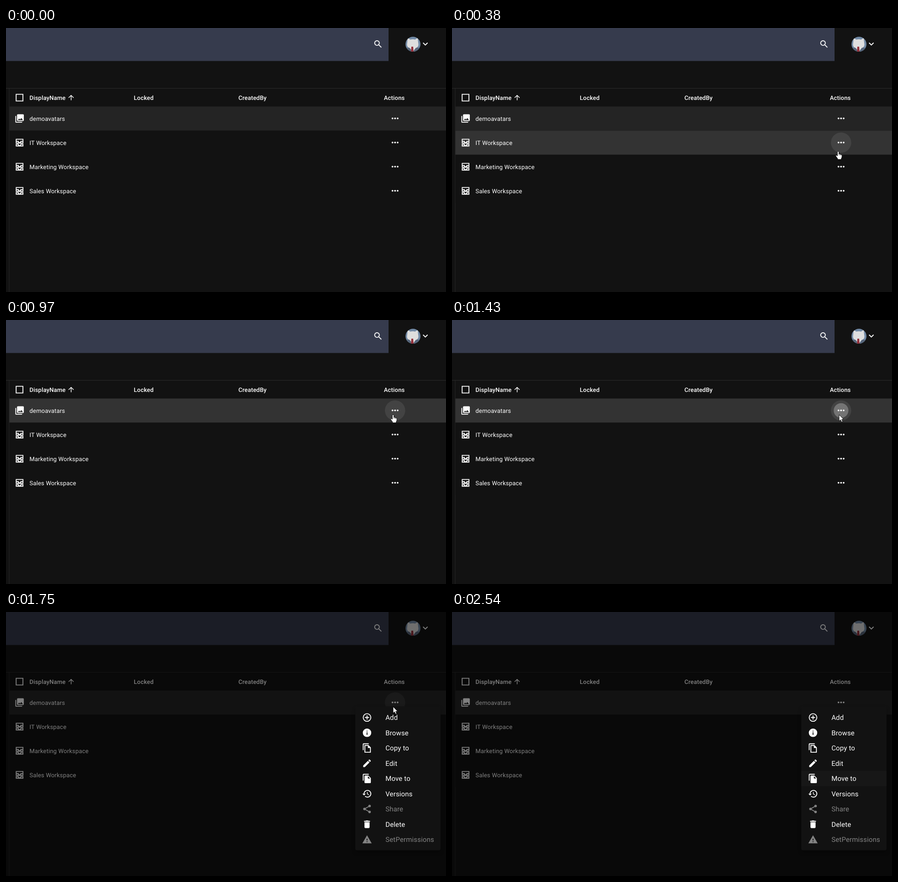
These frames come from a looping animation (965x580 px, 3150 ms). An HTML page:

```html
<!DOCTYPE html>
<html lang="en">
<head>
<meta charset="utf-8">
<title>Content list with action menu</title>
<style>
html, body { margin: 0; width: 100%; height: 100%; overflow: hidden; background: #121212; }
svg { display: block; width: 965px; height: 580px; }
text { font-family: Roboto, sans-serif; fill: #fff; text-rendering: geometricPrecision; letter-spacing: .15px; }
.cell { font-size: 13.1px; }
.head { font-size: 13.1px; font-weight: 500; }
.item { font-size: 15px; }
</style>
</head>
<body>
<svg id="stage" viewBox="0 0 965 580" xmlns="http://www.w3.org/2000/svg"></svg>
<script>
const LOOP = 3150;
const ROW_TOP = 172.5, ROW_H = 53, BTN_X = 853.3;
const stage = document.getElementById('stage');

function add(parent, tag, attrs, text) {
  const el = document.createElementNS('http://www.w3.org/2000/svg', tag);
  for (const k in attrs) el.setAttribute(k, attrs[k]);
  if (text) el.textContent = text;
  parent.appendChild(el);
  return el;
}
const set = (el, attrs) => { for (const k in attrs) el.setAttribute(k, attrs[k]); };
const group = parent => add(parent, 'g', {});
const rect = (parent, x, y, width, height, fill) => add(parent, 'rect', { x, y, width, height, fill });
const disc = (parent, cx, cy, r, fill) => add(parent, 'circle', { cx, cy, r, fill });
const label = (parent, x, y, cls, text) => add(parent, 'text', { x, y, class: cls }, text);

// Icons live on a 24-unit grid: fill path, 2-unit stroke path, 6-unit round dots
const icons = {
  box: { line: 'M4 4h16v16H4z' },
  up: { fill: 'M4 12l1.41 1.41L11 7.83V20h2V7.83l5.58 5.59L20 12l-8-8z' },
  photos: { fill: 'M22 16V4c0-1.1-.9-2-2-2H8c-1.1 0-2 .9-2 2v12c0 1.1.9 2 2 2h12c1.1 0 2-.9 2-2zm-11-4l2.03 2.71L16 11l4 5H8zM2 6v14c0 1.1.9 2 2 2h14v-2H4V6z' },
  inbox: { line: 'M4 4h16v9H4zM4 9h5a3 3 0 0 0 6 0h5M4 16h5a3 3 0 0 0 6 0h5v4H4z' },
  search: { line: 'M4 9.5a5.5 5.5 0 1 0 11 0a5.5 5.5 0 1 0-11 0M13.6 13.6l6.2 6.2' },
  down: { fill: 'M16.59 8.59L12 13.17 7.41 8.59 6 10l6 6 6-6z' },
  plus: { line: 'M3 12a9 9 0 1 0 18 0a9 9 0 1 0-18 0M12 7v10M7 12h10' },
  info: { fill: 'M2 12a10 10 0 1 0 20 0a10 10 0 1 0-20 0M11 11h2v6h-2zM11 7h2v2h-2z' },
  copy: { fill: 'M16 1H4c-1.1 0-2 .9-2 2v14h2V3h12zM14 7v5h5l2-1l-6-6z', line: 'M7 6h7.6L20 11.4V22H7z' },
  pen: { fill: 'M3 17.25V21h3.75L17.81 9.94l-3.75-3.75zM20.71 7.04c.39-.39.39-1.02 0-1.41l-2.34-2.34c-.39-.39-1.02-.39-1.41 0l-1.83 1.83 3.75 3.75z' },
  move: { fill: 'M16 1H4c-1.1 0-2 .9-2 2v14h2V3h12zM15 5l6 6v10c0 1.1-.9 2-2 2H8c-1.1 0-2-.9-2-2V7c0-1.1.9-2 2-2zM14 12h5.5L14 6.5z' },
  history: { fill: 'M1 12l4 4 4-4zM12 8v5l4.28 2.54.72-1.21-3.5-2.08V8z', line: 'M5 12a8 8 0 1 1 2.35 5.65' },
  share: { line: 'M18 5L6 12l12 7', dots: 'M18 5h0M6 12h0M18 19h0' },
  bin: { fill: 'M6 19c0 1.1.9 2 2 2h8c1.1 0 2-.9 2-2V7H6zM19 4h-3.5l-1-1h-5l-1 1H5v2h14z' },
  warn: { fill: 'M1 21h22L12 2zM11 16h2v2h-2zM11 10h2v4h-2z' }
};

function icon(parent, name, x, y, scale = .93) {
  const g = add(parent, 'g', { transform: `translate(${x} ${y}) scale(${scale}) translate(-12 -12)` });
  const { fill, line, dots } = icons[name];
  if (fill) add(g, 'path', { d: fill, fill: '#fff', 'fill-rule': 'evenodd' });
  if (line) add(g, 'path', { d: line, fill: 'none', stroke: '#fff', 'stroke-width': 2 });
  if (dots) add(g, 'path', { d: dots, stroke: '#fff', 'stroke-width': 6, 'stroke-linecap': 'round' });
}

// Page
rect(stage, 0, 0, 965, 580, '#121212');
rect(stage, 0, 0, 839, 72.5, '#363b4d');
icon(stage, 'search', 816, 35.4);
icon(stage, 'down', 919.7, 35);

const defs = add(stage, 'defs', {});
disc(add(defs, 'clipPath', { id: 'face' }), 892.6, 35.6, 16.4);
const blur = add(defs, 'filter', { id: 'soft', x: '-20%', y: '-20%', width: '140%', height: '140%' });
add(blur, 'feGaussianBlur', { stdDeviation: 5 });

const avatar = add(stage, 'g', { 'clip-path': 'url(#face)' });
rect(avatar, 876, 19, 34, 34, '#7189a5');
add(avatar, 'path', { d: 'M876 53V46Q884 41 892 41T910 46V53z', fill: '#56657a' });
add(avatar, 'path', { d: 'M881 22l6 3.5q5-1.5 10 0l6-3.5 1 10q2 8-3 11-9 4-18 0-5-3-3-11z', fill: '#dedede' });
add(avatar, 'path', { d: 'M885 43h14l-7 10z', fill: '#e4e4e4' });
add(avatar, 'path', { d: 'M889 41h4l1 12h-6z', fill: '#94303a' });

rect(stage, 0, 132, 965, 1, '#2b2b2b');
rect(stage, 6.5, 133, 1, 447, '#272727');
icon(stage, 'box', 29.7, 153);
icon(stage, 'up', 142.8, 152.8, .74);
[['DisplayName', 51.5], ['Locked', 280.3], ['CreatedBy', 509.7], ['Actions', 828.7]]
  .forEach(([text, x]) => label(stage, x, 157.6, 'head', text));

const names = ['demoavatars', 'IT Workspace', 'Marketing Workspace', 'Sales Workspace'];
const rows = names.map((name, i) => {
  const top = ROW_TOP + i * ROW_H, y = top + 26.3;
  const bg = rect(stage, 7.5, top, 958, ROW_H, '#121212');
  const halo = disc(stage, BTN_X, y, 22.3, '#fff');
  const ripple = disc(stage, BTN_X, y, 0, '#fff');
  icon(stage, i ? 'inbox' : 'photos', 29.8, y);
  label(stage, 51.5, y + 4.8, 'cell', name);
  for (const dx of [-5.6, 0, 5.6]) disc(stage, BTN_X + dx, y - .2, 1.9, '#fff');
  return { top, y, bg, halo, ripple };
});

// Menu
const shade = rect(stage, 0, 0, 965, 580, '#000');
const menu = group(stage);
set(rect(menu, 767, 213, 185, 314, '#000'), { filter: 'url(#soft)', opacity: .35 });
set(rect(menu, 766, 207.3, 187, 316.2, '#121212'), { rx: 3.7 });
const mark = rect(menu, 766, 349, 187, 33.5, '#171717');
[['plus', 'Add'], ['info', 'Browse'], ['copy', 'Copy to'], ['pen', 'Edit'], ['move', 'Move to'],
 ['history', 'Versions'], ['share', 'Share', 1], ['bin', 'Delete'], ['warn', 'SetPermissions', 1]]
  .forEach(([name, text, off], i) => {
    const g = add(menu, 'g', { opacity: off ? .48 : 1 }), y = 231.8 + i * 33.5;
    icon(g, name, 791.8, y);
    label(g, 832.2, y + 5.4, 'item', text);
  });

// Pointer
const pointer = group(stage);
const pen = { fill: '#fff', stroke: '#000', 'stroke-width': .9, 'stroke-linejoin': 'round' };
const arrow = add(pointer, 'path', { d: 'M0 0V14.2L3.2 11.3 5.4 16.2 7.9 15.1 5.7 10.4H10z', ...pen });
const hand = group(pointer);
add(hand, 'path', { d: 'M-1.7 1.5Q-1.5 0 0 0T1.6 1.5V5.4Q3.3 4.9 4 6.2 5.4 5.8 6 7 8 6.8 8.2 8.6V12Q8 14 6.8 15.6V17.8H-1.2V16Q-3 13.5-5 10.8-5.8 9-4.3 8.5-3 8.4-1.7 10z', ...pen });
add(hand, 'path', { d: 'M1.6 5.4v3.2M4 6.2v2.6M6 7v2', stroke: '#000', 'stroke-width': .7 });
const click = disc(stage, 849, 208, 11.2, '#ff0');
click.setAttribute('opacity', .47);

// Screen refresh times with the pointer place: [ms, x, y]
const steps = [
  [0], [70, 862, 402], [140, 858, 362], [210, 854, 326], [290, 850, 293], [380, 847, 271],
  [450, 844, 250], [520, 842, 240], [600, 841, 236], [660, 841, 234], [740, 843, 221], [820, 847, 204],
  [890, 850, 197], [970, 849, 208], [1120, 849, 208], [1290, 849, 208], [1360, 849, 208],
  [1430, 849, 208], [1520, 849, 208], [1600, 849, 208], [1670, 849, 208], [1750, 849, 208],
  [2440, 889, 364], [2540]
];
const clamp = v => Math.max(0, Math.min(1, v));
const ease = p => { const q = 1 - (1 - p) ** 1.5; return q * q * (3 - 2 * q); };

function draw(ms) {
  const [t, x, y] = steps.filter(s => s[0] <= ms).pop();
  const shown = x !== undefined, opened = t >= 1520;
  let onButton = false;

  rows.forEach((row, i) => {
    const over = shown && !opened && y >= row.top && y < row.top + ROW_H;
    const near = over && Math.hypot(x - BTN_X, y - row.y) < 22.5;
    onButton = onButton || near;
    const glow = near || (i === 0 && opened && t < 2440);
    row.bg.setAttribute('fill', over ? '#333' : i ? '#121212' : '#242424');
    row.halo.setAttribute('opacity', glow ? .08 : 0);
  });

  const grow = t < 1290 ? 0 : Math.min(22.3, 4.5 + (t - 1290) * .083);
  set(rows[0].ripple, { r: grow, opacity: .26 * clamp((1690 - t) / 260) });

  const p = ease(clamp((t - 1460) / 290));
  const sx = .75 + .25 * p;
  shade.setAttribute('opacity', p * .5);
  set(menu, {
    opacity: p,
    transform: `translate(849 207.3) scale(${sx} ${sx * sx}) translate(-849 -207.3)`
  });
  mark.setAttribute('opacity', t >= 2440 ? 1 : 0);

  const useHand = (onButton && t < 1430) || t >= 2440;
  pointer.style.display = shown ? '' : 'none';
  if (shown) pointer.setAttribute('transform', `translate(${x} ${y})`);
  hand.style.display = useHand ? '' : 'none';
  arrow.style.display = useHand ? 'none' : '';
  click.style.display = t === 1120 ? '' : 'none';
}

const start = performance.now();
function tick() {
  draw((performance.now() - start) % LOOP);
  requestAnimationFrame(tick);
}
tick();
</script>
</body>
</html>
```
